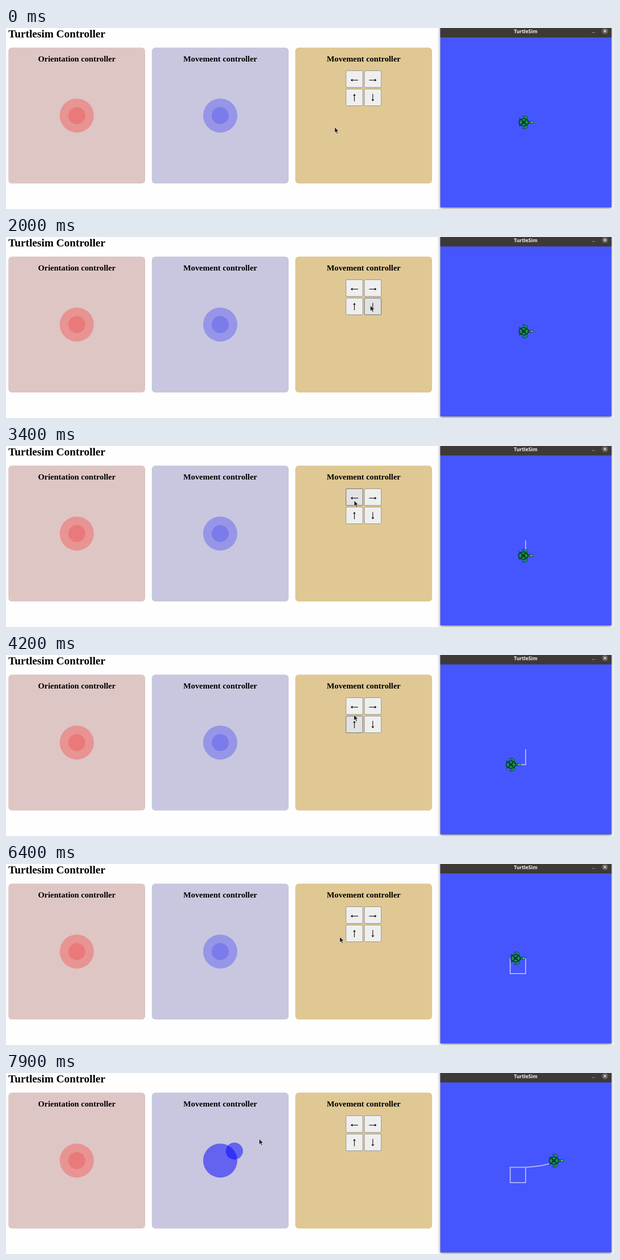
Animation, 1280 px wide and 383 px high, one loop 8 s. Source, as an HTML page:

```html
<!DOCTYPE html>
<html lang="en">
<head>
<meta charset="utf-8">
<title>Turtlesim Controller</title>
<style>
  html, body { margin: 0; width: 100%; height: 100%; overflow: hidden; background: #fefefe; }
  svg { display: block; width: 100%; height: 100%; }
  .serif { font: bold 17.28px "Liberation Serif", serif; text-anchor: middle; }
  .serif.title { font-size: 23.04px; text-anchor: start; }
  .window { filter: drop-shadow(0 0 .4px rgba(0, 0, 0, .3)) drop-shadow(0 2px 3.2px rgba(0, 0, 0, .5)); }
  .caption { font: bold 10.3px "Open Sans", "Noto Sans", sans-serif; text-anchor: middle; fill: #f3f1ee; }
  .key rect { fill: #efeff0; stroke: #85827c; stroke-width: .9; }
  .key.hover rect { fill: #e2e2e5; stroke: #55534f; }
  .turtle { stroke: #08251a; stroke-width: .8; stroke-linejoin: round; fill: #16925b; }
</style>
</head>
<body>
<svg viewBox="0 0 1280 383">
  <rect width="1280" height="383" fill="#fefefe"/>
  <text class="serif title" x="5" y="20">Turtlesim Controller</text>

  <g id="panels"></g>
  <g id="keys"></g>

  <g class="window">
    <path d="M914.5 -10H1274.5V379.5H914.5Z" fill="#4556ff"/>
    <path d="M914.5 -10H1274.5V20H914.5Z" fill="#3d3937"/>
  </g>
  <text class="caption" x="1094" y="10.7">TurtleSim</text>
  <path d="M1234 9.5h6" stroke="#a5a29e"/>
  <circle cx="1261" cy="6.5" r="6.6" fill="#63605c"/>
  <path d="M1258.5 4l5 5m0 -5l-5 5" stroke="#f3f1ee" stroke-width="1.2"/>

  <polyline id="trail" fill="none" stroke="#b4baff" stroke-width="2.1"/>
  <g id="turtle" class="turtle">
    <g id="limbs">
      <path d="M-2 -6C-1 -10 -4 -11 -7 -12.3C-4 -15.5 4 -13.5 4.6 -8L2 -5Z"/>
      <path d="M-9 -6L-13.5 -8.5L-13 -5L-11 -3Z"/>
    </g>
    <use href="#limbs" transform="scale(1 -1)"/>
    <path d="M4 -2H12V2H4Z"/>
    <ellipse cx="13" rx="3.4" ry="2.8" fill="#43b57c"/>
    <ellipse cx="-4" rx="10.5" ry="8.2" fill="#0b3d28"/>
    <g id="scutes" stroke="none">
      <path d="M-13.6 0L-10 -5L-7 0L-10 5Z"/>
      <path d="M-8.6 -6L-3.5 -7.2L.4 -5.6L-4 -2.2Z"/>
    </g>
    <use href="#scutes" transform="translate(-8 0) rotate(180)"/>
  </g>

  <path id="cursor" d="M0 0V11.8L2.7 9.3L4.8 13.7L6.8 12.8L4.8 8.5H8.5Z"
        fill="#1d1d1f" stroke="#f4f4f4" stroke-width=".7"/>
</svg>

<script>
const LOOP = 8000, STEP = 100;
const KEY_SIZE = 35.3, KEY_PITCH = 38.8;
const UNIT = 32.5;          // one turtle unit, travelled in a second
const STICK_RADIUS = 36;
const DRAG_START = 7400, DRAG_TIME = 500;

const byId = id => document.getElementById(id);
const progress = (t, start, duration) => Math.min(1, Math.max(0, (t - start) / duration));
const moveTo = (element, [x, y]) => element.setAttribute('transform', `translate(${x} ${y})`);

const panels = [
  { fill: '#dec6c5', label: 'Orientation controller', stick: '#f00' },
  { fill: '#c8c7df', label: 'Movement controller', stick: '#00f' },
  { fill: '#dfc893', label: 'Movement controller' },
];
const joystick = (x, color) => `<g class="stick" opacity=".5" fill="${color}">
  <circle cx="${x}" cy="185.3" r="${STICK_RADIUS}" opacity=".5"/>
  <circle class="knob" cx="${x}" cy="185.3" r="${STICK_RADIUS / 2}" opacity=".5"/></g>`;

byId('panels').innerHTML = panels.map(({ fill, label, stick }, i) => {
  const x = 5 + 302 * i;
  return `<rect x="${x}" y="41.6" width="288" height="287.4" rx="7.2" fill="${fill}"/>
    <text class="serif" x="${x + 144}" y="71">${label}</text>
    ${stick ? joystick(x + 144, stick) : ''}`;
}).join('');

// Left, right, up and down keys in a two by two grid.
const keys = [0, 180, 90, 270].map((angle, i) => ({
  angle, x: 715.8 + KEY_PITCH * (i % 2), y: 90.4 + KEY_PITCH * (i >> 1), drop: i < 2 ? 2.3 : .4,
}));
byId('keys').innerHTML = keys.map(({ angle, x, y, drop }) => `
  <g class="key">
    <rect x="${x}" y="${y}" width="${KEY_SIZE}" height="${KEY_SIZE}" rx="1.6"/>
    <path d="M-7.8 0L-3.6 -3.1L-4.4 -.6H7.8V.6H-4.4L-3.6 3.1Z"
          transform="translate(${x + KEY_SIZE / 2} ${y + KEY_SIZE / 2 + drop}) rotate(${angle})"/>
  </g>`).join('');

// Pointer moves: start, duration, destination.
const pointerHome = [692, 210];
const pointerMoves = [
  [400, 400, 768, 150], [800, 300, 874, 164], [1100, 100, 841, 166],
  [1300, 200, 742, 148], [1500, 100, 767, 145],
  [2700, 400, 733, 115.5], [4000, 400, 732, 138], [4700, 500, 768.5, 111.5],
  [6100, 600, 637, 197], [6700, 300, 485, 199.5], [7100, 100, 470, 182],
  [DRAG_START, DRAG_TIME, 533, 139.5],
];
const pointerAt = t => pointerMoves.reduce(([x, y], [start, duration, toX, toY]) => {
  const k = progress(t, start, duration);
  return [x + (toX - x) * k, y + (toY - y) * k];
}, pointerHome);

// One unit per key press: start, direction. The joystick then curves away.
const turtleLegs = [[2000, 0, 1], [3370, -1, 0], [4620, 0, -1], [5930, 1, 0]];
function turtleAt(t) {
  const drag = progress(t, DRAG_START, DRAG_TIME);
  let x = 1094 + 63.5 * drag ** 1.2;
  let y = 199.5 - 4 * drag - 10 * drag ** 4;
  for (const [start, dx, dy] of turtleLegs) {
    const distance = UNIT * progress(t, start, 1000);
    x += dx * distance;
    y += dy * distance;
  }
  return [x, y];
}

function knobAt(t) {
  const [grabX, grabY] = pointerAt(DRAG_START);
  const [x, y] = pointerAt(Math.max(t, DRAG_START));
  const dx = x - grabX, dy = y - grabY;
  const scale = Math.min(1, STICK_RADIUS / (Math.hypot(dx, dy) || 1));
  return [dx * scale, dy * scale];
}

const keyElements = document.querySelectorAll('.key');
const stick = document.querySelectorAll('.stick')[1];
const knob = stick.querySelector('.knob');

function draw(t) {
  moveTo(byId('cursor'), pointerAt(t));
  moveTo(byId('turtle'), turtleAt(t));
  moveTo(knob, knobAt(t));

  const trail = [];
  for (let s = 0; s <= t; s += STEP) trail.push(turtleAt(s));
  byId('trail').setAttribute('points', trail.join(' '));

  // The drawn pointer lags slightly behind the hover state.
  const [px, py] = pointerAt(t + 50);
  keys.forEach(({ x, y }, i) => {
    const inside = px > x && px < x + KEY_SIZE && py > y && py < y + KEY_SIZE;
    keyElements[i].classList.toggle('hover', inside);
  });

  stick.setAttribute('opacity', .5 + .5 * progress(t, DRAG_START - 50, 250));
}

function tick() {
  draw(Math.floor(performance.now() % LOOP / STEP) * STEP);
  requestAnimationFrame(tick);
}
tick();
</script>
</body>
</html>
```
